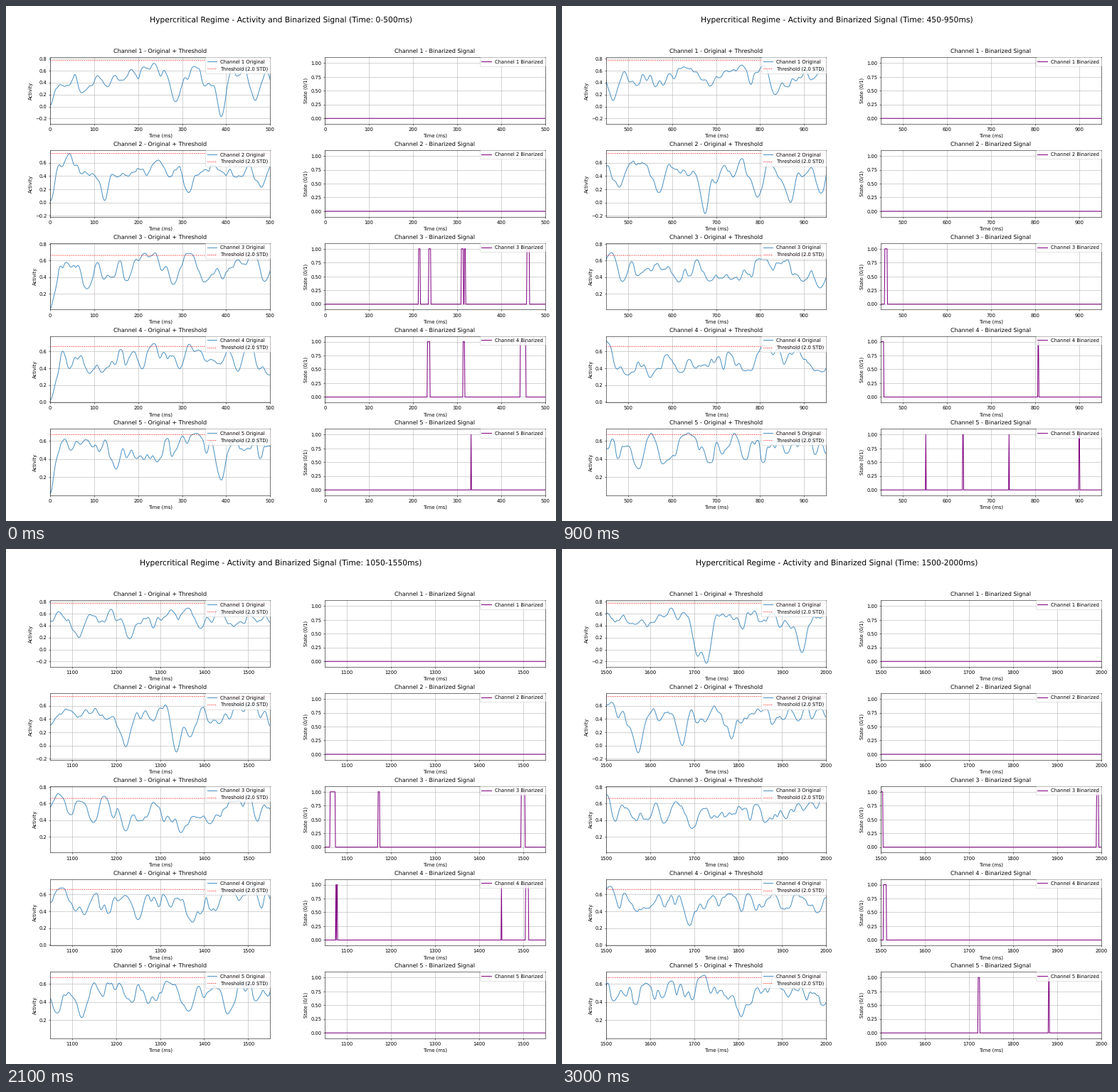
A matplotlib script that plays this animation: 773x725 px, repeating every 3100 ms.

```python
import numpy as np
import matplotlib.pyplot as plt
from matplotlib.animation import FuncAnimation
from matplotlib.ticker import MultipleLocator

WIDTH, HEIGHT, DPI = 773, 725, 48.3125
FRAMES, INTERVAL = 31, 100
WINDOW, SHIFT = 500, 50      # ms of signal shown, ms moved per frame
PULL = 13                    # ms over which a key point bends the curve
TIME = np.arange(2001)

plt.rcParams.update({"font.family": "DejaVu Sans", "text.hinting": "none"})

# Each channel: mean level, threshold, y limits,
# the strongest dips and peaks as (ms, activity),
# and the spans in ms during which the binarized state is 1.
CHANNELS = [
    dict(level=0.50, threshold=0.767, ylim=(-0.290, 0.817),
         keys=[(72, 0.23), (131, 0.33), (236, 0.72), (285, 0.08),
               (328, 0.67), (389, -0.17), (466, 0.10), (758, 0.69),
               (834, 0.20), (973, 0.22), (1116, 0.20), (1231, 0.18),
               (1364, 0.69), (1708, -0.10), (1728, -0.23), (1945, -0.05)],
         bursts=[]),
    dict(level=0.48, threshold=0.740, ylim=(-0.217, 0.787),
         keys=[(44, 0.74), (124, 0.03), (315, 0.15), (480, 0.23),
               (570, 0.15), (675, -0.17), (794, 0.08), (869, 0.00),
               (938, 0.14), (1038, 0.21), (1222, -0.02), (1337, -0.10),
               (1368, 0.13), (1573, -0.11), (1673, 0.00), (1785, 0.10)],
         bursts=[]),
    dict(level=0.49, threshold=0.663, ylim=(0.007, 0.810),
         keys=[(84, 0.26), (280, 0.31), (350, 0.34), (486, 0.34),
               (615, 0.34), (714, 0.39), (897, 0.35), (936, 0.27),
               (1150, 0.36), (1222, 0.27), (1347, 0.25), (1695, 0.30)],
         bursts=[(213, 217), (236, 241), (310, 315), (317, 320), (459, 465),
                 (1062, 1074), (1171, 1175), (1496, 1505), (1990, 1995)]),
    dict(level=0.49, threshold=0.659, ylim=(-0.008, 0.782),
         keys=[(90, 0.34), (118, 0.35), (298, 0.37), (428, 0.35),
               (500, 0.32), (550, 0.29), (766, 0.37), (925, 0.37),
               (1128, 0.36), (1250, 0.30), (1374, 0.27), (1690, 0.23)],
         bursts=[(233, 239), (314, 318), (444, 457), (807, 809),
                 (1075, 1076), (1077, 1079), (1451, 1452), (1506, 1513)]),
    dict(level=0.50, threshold=0.667, ylim=(0.002, 0.728),
         keys=[(150, 0.29), (243, 0.37), (301, 0.65), (389, 0.17),
               (525, 0.29), (578, 0.34), (762, 0.38), (1000, 0.25),
               (1066, 0.28), (1122, 0.23), (1365, 0.30), (1453, 0.27),
               (1807, 0.24)],
         bursts=[(332, 333), (552, 553), (636, 638), (741, 742),
                 (900, 902), (1721, 1725), (1881, 1883)]),
]


def smooth_noise(rng, sigma):
    """White noise blurred over sigma ms, scaled to unit deviation."""
    x = np.arange(-4 * sigma, 4 * sigma + 1)
    noise = np.convolve(rng.normal(size=TIME.size),
                        np.exp(-(x / sigma) ** 2 / 2), mode="same")
    return noise / noise.std()


def activity(rng, level, threshold, keys, bursts):
    """Random wander kept below the threshold, bent through the key points."""
    wander = smooth_noise(rng, 5) + 0.12 * smooth_noise(rng, 2)
    room = threshold - 0.02 - level
    curve = level + room * np.tanh(0.09 * wander / room)
    peaks = [((start + end) / 2, threshold + 0.01 + 0.004 * (end - start))
             for start, end in bursts]
    for t, value in [(0, 0.02)] + keys + peaks:
        curve += (value - curve) * np.exp(-((TIME - t) / PULL) ** 2)
    return curve


def binary(bursts):
    state = np.zeros(TIME.size)
    for start, end in bursts:
        state[start:end] = 1
    return state


def add_axes(left, row):
    top = 72.5 + 130.75 * row
    return fig.add_axes([left / WIDTH, 1 - (top + 93.5) / HEIGHT,
                         309.4 / WIDTH, 93.5 / HEIGHT])


def dress(ax, title, ylabel, ylim, ystep):
    ax.set_title(title, pad=10)
    ax.set_xlabel("Time (ms)")
    ax.set_ylabel(ylabel)
    ax.set_ylim(*ylim)
    ax.xaxis.set_major_locator(MultipleLocator(100))
    ax.yaxis.set_major_locator(MultipleLocator(ystep))
    ax.grid(True)
    ax.legend(loc="upper right", borderaxespad=0)


fig = plt.figure(figsize=(16, 15.0065), dpi=DPI, facecolor="white")
heading = fig.suptitle("", fontsize=16)
rng = np.random.default_rng(5)

for row, ch in enumerate(CHANNELS):
    name = f"Channel {row + 1}"
    signal = activity(rng, ch["level"], ch["threshold"],
                      ch["keys"], ch["bursts"])

    ax = add_axes(61.9, row)
    ax.plot(TIME, signal, color="tab:blue", alpha=0.8,
            label=f"{name} Original")
    ax.axhline(ch["threshold"], color="red", linestyle=":", snap=False,
               label="Threshold (2.0 STD)")
    dress(ax, f"{name} - Original + Threshold", "Activity", ch["ylim"], 0.2)

    ax = add_axes(448.2, row)
    ax.plot(TIME, binary(ch["bursts"]), color="purple", snap=False,
            label=f"{name} Binarized")
    dress(ax, f"{name} - Binarized Signal", "State (0/1)", (-0.1, 1.1), 0.25)


def update(frame):
    start = frame * SHIFT
    end = start + WINDOW
    heading.set_text("Hypercritical Regime - Activity and Binarized Signal "
                     f"(Time: {start}-{end}ms)")
    for ax in fig.axes:
        ax.set_xlim(start, end)
    return []


anim = FuncAnimation(fig, update, frames=FRAMES, interval=INTERVAL,
                     repeat=True, repeat_delay=0, blit=False)
plt.show()
```
